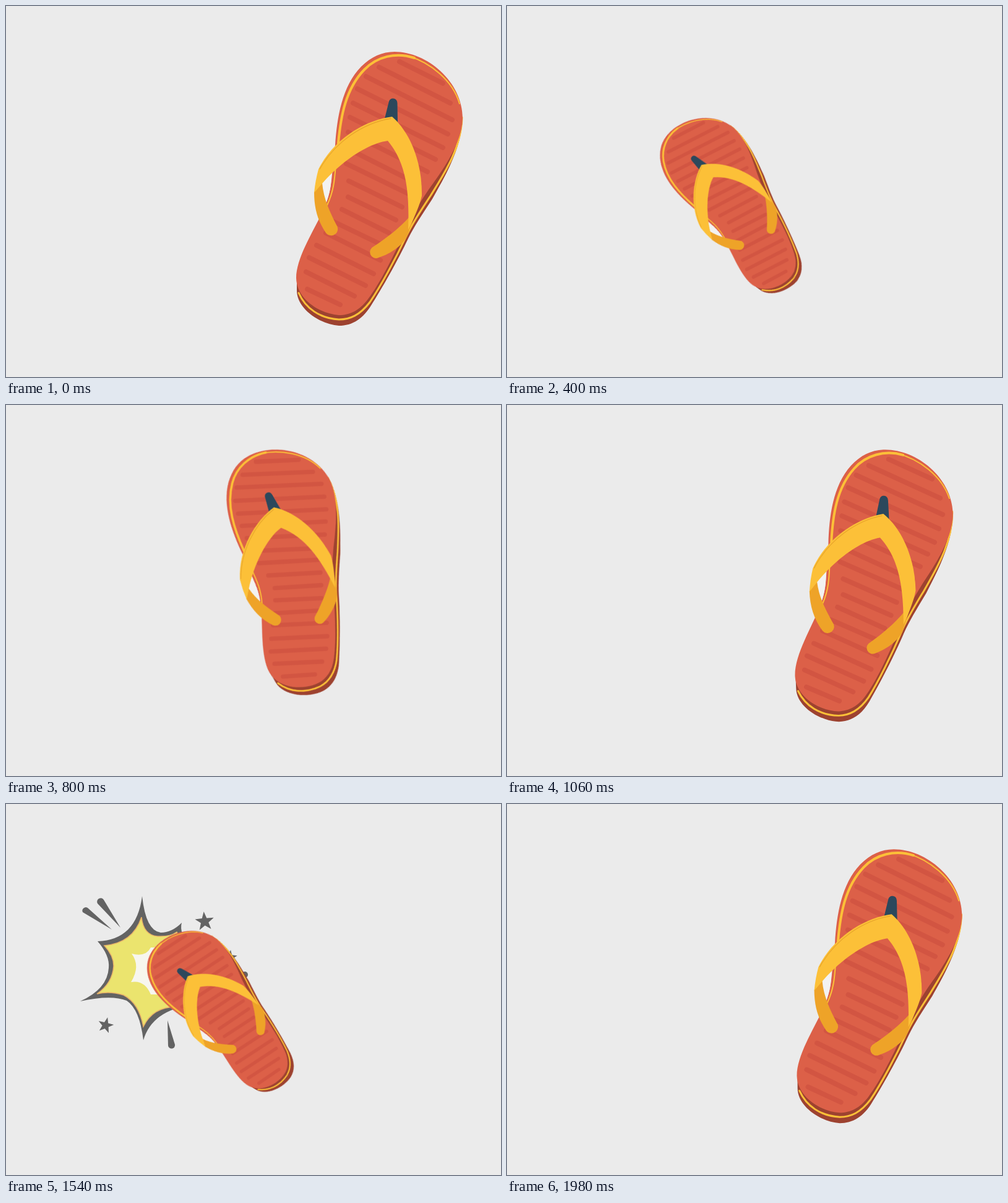
Recreate the animation shown at these times as an HTML page without scripts. Size 800 px wide and 600 px high, loop 2 s.

```html
<!DOCTYPE html>
<html lang="en">
<head>
<meta charset="utf-8">
<title>Flip-flop slap</title>
<style>
  html, body { margin: 0; width: 100%; height: 100%; overflow: hidden; background: #ebebeb; }
  svg { display: block; width: 100vw; height: 100vh; }
  .shoe {
    transform-origin: 415px 511px;
    animation: swing 1s infinite, shrink 1s infinite;
  }
  .burst { animation: flash 1s linear infinite; }
  @keyframes swing {
    0% { rotate: 0deg; animation-timing-function: cubic-bezier(.333, 0, .38, 1); }
    58% { rotate: -60deg; animation-timing-function: cubic-bezier(.38, 0, .667, 1); }
    100% { rotate: 0deg; }
  }
  @keyframes shrink {
    0%, 100% { scale: 1; animation-timing-function: cubic-bezier(.333, 0, .667, 1); }
    50% { scale: .662; animation-timing-function: cubic-bezier(.333, 0, .667, 1); }
  }
  @keyframes flash {
    0%, 50% { opacity: 0; }
    54%, 58% { opacity: 1; }
    62%, 100% { opacity: 0; }
  }
  .ink { fill: #636363; }
  .line { fill: none; stroke: #fcc038; stroke-linecap: round; }
  .ribs { fill: none; stroke: #d25542; stroke-width: 8; stroke-linecap: round; }
  .strap { fill: #fcc038; }
  .under { fill: #eea328; }
</style>
</head>
<body>
<svg viewBox="0 0 800 600">
  <defs>
    <path id="star" d="M0-16 3.8-5.3 15.2-4.9 6.2 2 9.4 12.9 0 6.5-9.4 12.9-6.2 2-15.2-4.9-3.8-5.3Z"/>
  </defs>

  <g class="burst">
    <g class="ink">
      <path d="M220 149Q226 205 250 208Q268 208 284 192Q279 208 300 240L320 270 300 325Q236 334 222 382Q216 332 195 318Q170 308 120 319Q164 299 166 265Q168 245 148 222Q211 220 220 149Z"/>
      <path d="M124 175A5.5 5.5 0 0 1 132 168L171 203Z"/>
      <path d="M148 161A5.5 5.5 0 0 1 158 155L185 200Z"/>
      <path d="M262 391A5.5 5.5 0 0 0 273 389L261 350Z"/>
      <circle cx="386" cy="276" r="5"/>
      <use href="#star" transform="translate(321 190) rotate(-5)"/>
      <use href="#star" transform="translate(161 358) rotate(14) scale(.83)"/>
      <use href="#star" transform="translate(362 248) rotate(5) scale(.75)"/>
    </g>
    <path fill="#ebe46e" stroke="#e9b268" stroke-width="1.5" d="M219 183Q222 212 245 214Q265 215 276 207L300 250 280 328Q238 326 222 360Q215 322 190 309Q168 302 147 307Q172 290 174 262Q174 245 159 229Q205 225 219 183Z"/>
    <path fill="#f7f6ee" d="M234 232Q226 248 203 242Q218 262 202 288Q224 284 234 308H260V232Z"/>
  </g>

  <g class="shoe">
    <!-- sole -->
    <path fill="#9d4230" d="M738 180C737 230 708 278 689 312C672 338 660 356 650 376C633 412 607 458 589 486C574 509 557 517 538 517C508 515 470 490 470 460V440L600 300Z"/>
    <path class="line" stroke-width="3" d="M737 180C736 230 707 273 686 307C669 333 656 352 646 374C629 410 605 454 588 479C572 500 556 507 538 507C507 505 484 489 473 464"/>
    <path fill="#dc6048" d="M628 74C680 74 738 122 738 182C737 223 704 268 683 297C665 324 653 344 644 366C628 401 605 448 585 474C571 493 555 500 538 500C508 498 470 475 469 440C469 405 500 360 515 325C528 295 526 270 532 225C535 180 543 130 574 98C590 82 608 74 628 74Z"/>
    <path class="ribs" d="M636 90 706 125M603 99 718 157M582 114 721 184M568 134 714 207M561 157 706 229M556 180 694 248M553 204 681 268M549 229 668 289M550 255 655 306M554 283 640 325M553 309 630 346M543 329 619 367M530 349 611 388M517 367 605 411M502 387 594 433M490 407 581 452M485 430 563 469M487 458 540 483"/>
    <path class="line" stroke-width="4" d="M660 84C630 74 599 82 579 103C549 134 541 178 537 222"/>
    <path class="line" stroke-width="2" d="M650 81C685 91 722 120 733 158M537 220C530 265 535 288 519 322"/>
    <path fill="#f3f2f1" d="M510 288 526 270C526 290 523 304 517 319Q511 304 510 288Z"/>

    <!-- toe post -->
    <path fill="#2c485c" d="M612 182 619 154Q621 149 626 149.500Q632 150 632.500 157L633 189Z"/>

    <!-- strap -->
    <path class="under" d="M498 301 511 286C513 312 524 334 534 354A10 10 0 0 1 517 367C503 346 498 326 498 301Z"/>
    <path class="under" d="M652 341C636 359 614 376 594 389A9.4 9.4 0 0 0 602 407C624 400 641 386 648 373L660 340Z"/>
    <path class="strap" d="M624 179C655 206 673 256 672 307Q668 326 650 362C652 303 648 255 617 218C585 222 541 252 511 287L498 302Q500 282 505 264C530 214 582 184 624 179Z"/>
    <path fill="none" stroke="#e9a62b" stroke-width="1.3" d="M507 264C532 219 578 189 622 182"/>
  </g>
</svg>
</body>
</html>
```
